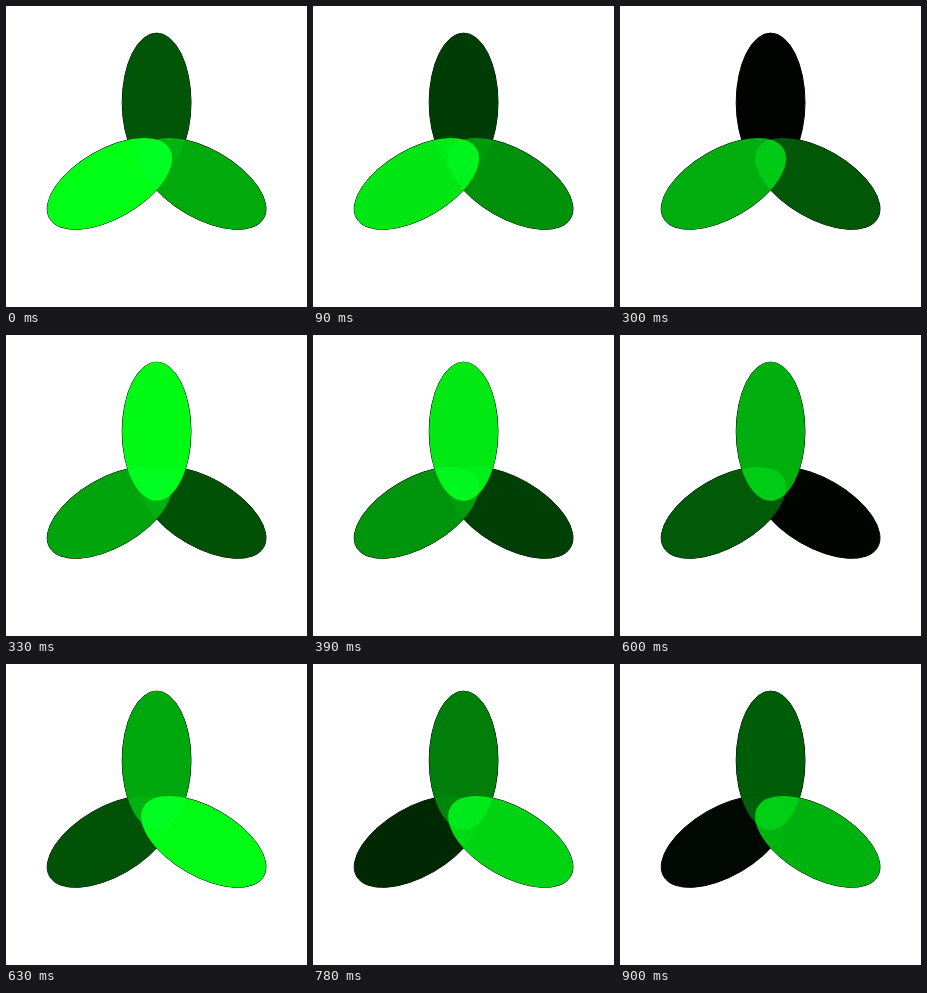
An HTML page with a canvas that plays this animation: 301 by 301 pixels, repeating every 930 ms.

```html
<!DOCTYPE html>
<html lang="en">
<head>
<meta charset="utf-8">
<title>Green petals</title>
<style>
html, body { margin: 0; width: 100%; height: 100%; overflow: hidden; background: #fff; }
canvas { display: block; }
</style>
</head>
<body>
<canvas width="301" height="301"></canvas>
<script>
const ctx = document.querySelector('canvas').getContext('2d');
const LOOP = 930, STEP = 30, CENTER = 150.6, OFFSET = 54.2;

// Each petal flashes at its own third of the loop, then fades to black.
const petals = [
  { angle: -120, start: 0 },
  { angle: 0, start: LOOP / 3 },
  { angle: 120, start: LOOP * 2 / 3 }
].map(({ angle, start }) => {
  const a = angle * Math.PI / 180;
  const path = new Path2D();
  path.ellipse(CENTER + OFFSET * Math.sin(a), CENTER - OFFSET * Math.cos(a),
    34.4, 69.3, a, 0, Math.PI * 2);
  return { path, start };
});

function fill(path, color, blend) {
  ctx.globalCompositeOperation = blend;
  ctx.fillStyle = color;
  ctx.fill(path);
}

function draw(time) {
  let step = Math.floor(time % LOOP / STEP);
  if (step === 14) step = 13; // one pose is held twice as long
  const level = p => 1 - (step * STEP - p.start + LOOP) % LOOP / LOOP;

  fill(new Path2D('M0 0H301V301H0Z'), '#fff', 'source-over');
  for (const { path } of petals) {
    fill(path, '#000', 'source-over');
    ctx.stroke(path);
  }
  const order = [...petals].sort((a, b) => level(a) - level(b));
  order.forEach((p, i) => {
    // The middle petal lets less of the one behind it through.
    if (i === 1) fill(p.path, 'rgba(0,0,0,.6)', 'source-over');
    const v = level(p);
    fill(p.path, `rgb(0,${Math.round(255 * v)},${Math.round(20 * v)})`, 'screen');
  });
}

function tick() {
  draw(performance.now());
  requestAnimationFrame(tick);
}
tick();
</script>
</body>
</html>
```
